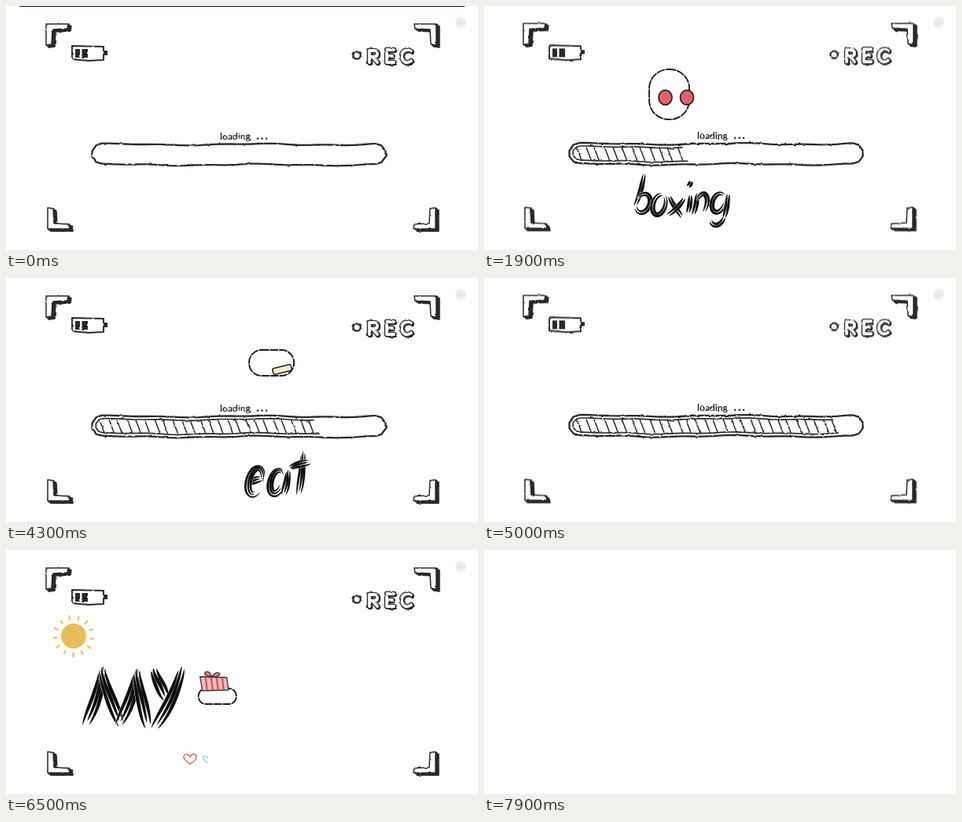
Animation of 600 by 312 pixels, one loop 8 s. Source, as an HTML page:

```html
<!DOCTYPE html>
<html lang="en">
<head>
<meta charset="utf-8">
<title>My day</title>
<style>
html, body { margin: 0; width: 100%; height: 100%; overflow: hidden; background: #fdfdfd; }
svg { display: block; width: 100vw; height: 100vh; }
</style>
</head>
<body>
<svg id="stage" viewBox="0 0 600 312" xmlns="http://www.w3.org/2000/svg"></svg>
<script>
const INK = '#292929', PAPER = '#fdfdfd';
const LOOP = 8000, STEP = 100;
const TURN = Math.PI * 2;
const stage = document.getElementById('stage');

const times = (n, fn) => Array.from({ length: n }, (_, i) => fn(i));
const pathOf = pts => 'M' + pts.map(p => p.map(v => v.toFixed(1)).join(' ')).join('L');
const line = (d, width) =>
  `<path d="${d}" fill="none" stroke="${INK}" stroke-width="${width}" stroke-linecap="round" stroke-linejoin="round"/>`;

// Pen moves: u in 0..1 gives a point. Stems start upright and sweep sideways.
const stem = (x0, y0, x1, y1) => u => [x0 + (x1 - x0) * u ** 1.4, y0 + (y1 - y0) * u];
const arc = (cx, cy, rx, ry, from, to) => u => {
  const a = (from + (to - from) * u) * TURN;
  return [cx + rx * Math.cos(a) - 0.2 * ry * Math.sin(a), cy + ry * Math.sin(a)];
};

// Brush stroke made of n tapering strands that draw together at the ends
function brush(pen, width, n) {
  const steps = 28;
  const strands = times(n, k => {
    const from = 0.04 * ((k * 2 + 1) % n), to = 1 - 0.04 * ((k + 1) % n);
    const left = [], right = [];
    for (let j = 0; j <= steps; j++) {
      const v = j / steps, u = from + (to - from) * v;
      const [x, y] = pen(u), [px, py] = pen(Math.max(0, u - 0.01)), [qx, qy] = pen(Math.min(1, u + 0.01));
      const dx = qx - px, dy = qy - py, len = Math.hypot(dx, dy) || 1;
      const swell = Math.sin(Math.PI * Math.min(0.999, v)) ** 0.6;
      const off = (k - (n - 1) / 2) * width / n * (0.55 + 0.45 * swell) + 0.05 * width * Math.sin(u * 6 + k);
      const half = width / n * 0.42 * swell;
      const side = h => [x - dy / len * (off + h), y + dx / len * (off + h)];
      left.push(side(half));
      right.unshift(side(-half));
    }
    return pathOf(left.concat(right)) + 'Z';
  });
  return `<path d="${strands.join('')}" fill="#0c0c0c" stroke="${PAPER}" stroke-width="1" paint-order="stroke"/>`;
}
const word = (label, width, n, pens) =>
  `<g role="img" aria-label="${label}">${pens.map(p => brush(p, width, n)).join('')}</g>`;

const title = word('MY DAY', 16, 3, [
  stem(124, 148, 101, 225), stem(122, 150, 147, 224), stem(168, 151, 143, 225), stem(166, 152, 181, 227),
  stem(188, 151, 204, 190), stem(224, 148, 188, 230),
  stem(293, 152, 281, 222), arc(290, 186, 41, 37, -0.31, 0.28),
  stem(373, 148, 344, 225), stem(373, 149, 389, 226), stem(341, 203, 386, 194),
  stem(396, 152, 407, 189), stem(431, 146, 398, 230)
]);
const boxing = word('boxing', 7.5, 2, [
  stem(204, 213, 192, 256), arc(202, 252, 9, 12, 0.55, 1.45),
  arc(223, 254, 8, 13, -0.2, 0.8),
  stem(236, 242, 252, 270), stem(255, 245, 233, 268),
  stem(263, 241, 259, 265), stem(264, 224, 259, 231),
  stem(272, 238, 266, 267), arc(276, 254, 7, 14, 0.55, 1.12),
  arc(298, 252, 8, 12, -0.1, -1.05), stem(311, 239, 305, 272), arc(297, 269, 9, 11, 0, 0.42)
]);
const eat = word('eat', 10, 3, [
  stem(307, 264, 325, 256), arc(317, 260, 9, 17, 0.02, -0.87),
  arc(344, 261, 8, 15, -0.1, -1), stem(359, 245, 353, 278),
  stem(378, 221, 372, 278), stem(361, 243, 387, 235)
]);

// L-shaped bracket mirrored into each corner, extruded down and to the right
function bracket(x, y, sx, sy) {
  const layer = (k, fill) =>
    `<path transform="translate(${x + k} ${y + k * 0.75}) scale(${sx} ${sy})" d="M0 0H28L27 6L8 7L7 26L0 27Z" fill="${fill}" stroke="${INK}" stroke-width="1.500" stroke-linejoin="round"/>`;
  return times(4, i => layer(4 - i, INK)).join('') + layer(0, PAPER);
}

function recLabel() {
  const d = 'M462 72V57H467Q472 57 472 61T467 65H463M467 66L472 72M493 56H484V72H493M484 64H491M515 58Q511 55 507 57Q503 59 503 64Q503 70 508 72Q512 73 515 70';
  const pen = (w, color, shift = 0) =>
    `<path transform="translate(${shift} ${shift})" d="${d}" fill="none" stroke="${color}" stroke-width="${w}" stroke-linejoin="round" stroke-linecap="round"/>`;
  return `<g role="img" aria-label="REC"><circle cx="446" cy="63" r="4.700" fill="${PAPER}" stroke="${INK}" stroke-width="2.300"/>`
    + pen(6.5, INK, 1) + pen(6.5, INK) + pen(3.8, PAPER) + '</g>';
}

const battery = line('M84 51L124 52V69L105 70L84 68Z', 1.9)
  + `<path d="M88 55h6v11h-6zM96.500 55h7.500v11h-7.500zM125 57h4v6h-4z" fill="${INK}"/>`;
const hud = bracket(51, 23, 1, 1) + bracket(547, 23, -1, 1) + bracket(53, 285, 1, -1) + bracket(546, 285, -1, -1)
  + battery + recLabel();

// Hand-drawn capsule: a rounded bar with slow waves along its edges
function capsule(x0, x1, cy, r) {
  const n = 160;
  return pathOf(times(n, i => {
    const a = (i + 0.5) / n * TURN, c = Math.cos(a), s = Math.sin(a);
    const end = Math.min(1, Math.abs(s) * 14);
    const x = (x0 + x1) / 2 + Math.sign(c) * ((x1 - x0) / 2 - r) * Math.min(1, Math.abs(c) * 1.01)
      + Math.sign(c) * r * Math.sqrt(1 - end * end);
    return [x, cy + Math.sign(s) * r * end + 0.9 * Math.sin(x / 29) + 0.5 * Math.sin(x / 11 + s)];
  })) + 'Z';
}
const hatch = times(31, i => {
  const x = 119 + i * 11.6 + Math.sin(i * 2.4);
  return `M${x} 182L${x + 6} 198`;
}).join('');
const bar = line(capsule(109, 483, 190, 13), 2.3)
  + `<g clip-path="url(#fillClip)">${line(capsule(114, 478, 190, 9), 1.7)}${line(hatch, 1.5)}</g>`
  + `<text x="272" y="171" font-family="Lato, sans-serif" font-size="12" font-weight="700" fill="${INK}">loading</text>`
  + times(3, i => `<circle cx="${320 + i * 5.5}" cy="169.500" r="1.200" fill="${INK}"/>`).join('');

// The performer: one plain rounded shape
const blob = (x, y, w, h) =>
  `<rect x="${x}" y="${y}" width="${w}" height="${h}" rx="${Math.min(w, h) * 0.48}" fill="#fff" stroke="#1c1c1c" stroke-width="1.900" stroke-dasharray="9 2.500" stroke-linecap="round"/>`;
const glove = (id, x) =>
  `<ellipse id="${id}" cx="${x}" cy="117" rx="8.500" ry="9.300" fill="#e85f66" stroke="#222" stroke-width="1.700"/>`;
const boxer = blob(210, 81, 51, 64) + glove('gloveL', 230.5) + glove('gloveR', 258);
const eater = blob(310, 92, 57, 33)
  + '<rect x="340" y="113" width="24" height="8" rx="2" fill="#f5ecc8" stroke="#222" stroke-width="1.500" transform="rotate(-14 352 117)"/>';
const carrier = blob(473, 177, 48, 20)
  + '<path d="M475 162L509 163L511 179L478 180Z" fill="#f3b9b9" stroke="#333" stroke-width="1.300"/>'
  + `<path d="${times(4, i => `M${482 + i * 7} 163L${484 + i * 7} 179`).join('')}" stroke="#c9585e" stroke-width="2.200"/>`
  + '<path d="M490 162Q478 161 482 156Q487 154 490 162Q496 154 500 158Q501 162 490 162Z" fill="#e07f82" stroke="#333" stroke-width="1.300"/>';

const rays = times(13, i => {
  const a = i / 13 * TURN, at = r => `${86 + Math.cos(a) * r} ${110 + Math.sin(a) * r}`;
  return `M${at(22)}L${at(25 + i % 2)}`;
}).join('');
const sun = '<circle cx="86" cy="110" r="16" fill="#e8bc58"/>'
  + `<path id="rays" d="${rays}" stroke="#ecc672" stroke-width="2.600" stroke-linecap="round"/>`;

const tints = ['#e8756b', '#79d6bd', '#ecdb9a', '#ead27a', '#cfb0c4', '#e5807a', '#74dab8'];
const hearts = tints.map((color, i) => {
  const s = 0.8 + 0.2 * Math.cos(i * 2.1);
  return `<path transform="translate(${234 + i * 21.9} ${268 - s}) rotate(${8 * Math.sin(i * 3)}) scale(${s} ${s * 0.85})" d="M0 8C-5 4 -9 0 -8 -4C-7 -8 -2 -8 0 -3C2 -9 8 -8 8 -3C8 1 4 5 0 8Z" fill="none" stroke="${color}" stroke-width="1.700"/>`;
}).join('');

const rough = seed => `<filter id="rough${seed}" filterUnits="userSpaceOnUse" x="0" y="0" width="600" height="312" color-interpolation-filters="sRGB">
  <feTurbulence type="fractalNoise" baseFrequency=".16" numOctaves="2" seed="${seed + 4}"/>
  <feDisplacementMap in="SourceGraphic" scale="2.400" xChannelSelector="R" yChannelSelector="G"/></filter>`;

stage.innerHTML = `<defs>${rough(0)}${rough(1)}
  <clipPath id="fillClip"><polygon id="fillEdge" points=""/></clipPath>
  <clipPath id="dayClip"><rect id="dayEdge" width="0" height="312"/></clipPath>
  <clipPath id="screen"><rect x="17" width="566" height="312"/></clipPath></defs>
  <rect width="600" height="312" fill="${PAPER}"/>
  <g id="scene">
    <path id="topLine" d="M17 .4H583" stroke="#111" stroke-width="1.200"/>
    <circle cx="578" cy="21" r="6.800" fill="#ececec"/>
    <g id="hud">${hud}</g>
    <g id="loading">
      <g id="bar">${bar}</g>
      <g id="boxing">${boxing}${boxer}</g>
      <g id="eat">${eat}<g id="eater">${eater}</g></g>
    </g>
    <g id="day">
      <g clip-path="url(#dayClip)">${sun}${title}${hearts}</g>
      <g clip-path="url(#screen)"><g id="carrier">${carrier}</g></g>
    </g>
  </g>`;

const set = (id, name, value) => document.getElementById(id).setAttribute(name, value);
const show = (id, on) => set(id, 'display', on ? 'inline' : 'none');

const progress = [[300, 110], [1900, 260], [3200, 363], [4300, 398], [5400, 482]];
function track(keys, t) {
  const i = keys.findIndex(k => t < k[0]);
  if (i === 0) return keys[0][1];
  if (i < 0) return keys[keys.length - 1][1];
  const [t0, a] = keys[i - 1], [t1, b] = keys[i];
  return a + (b - a) * (t - t0) / (t1 - t0);
}

function draw(now) {
  const t = Math.floor((now % LOOP) / STEP) * STEP;
  const pose = t % 650 > 405 ? 1 : 0;
  show('scene', t < 7900);
  show('topLine', t < 300);
  for (const id of ['hud', 'bar']) {
    set(id, 'filter', `url(#rough${pose})`);
    set(id, 'transform', `translate(${-pose} ${-0.7 * pose})`);
  }

  show('loading', t < 5600);
  const edge = track(progress, t);
  set('fillEdge', 'points', `100,170 ${edge - 11},170 ${edge + 4},208 100,208`);
  show('boxing', t >= 1100 && t < 2500);
  const jab = t % 400 < 200 ? 3 : 0;
  set('gloveL', 'cx', 230.5 + jab);
  set('gloveR', 'cx', 258 + jab);
  show('eat', t >= 2500 && t < 4700);
  set('eater', 'transform', `translate(${pose - 1} ${-pose})`);

  // The carrier crosses the stage and uncovers the title behind it
  show('day', t >= 5700);
  const front = 26 + (t - 5800) * 0.381;
  set('carrier', 'transform', `translate(${front - 521} ${t % 200 ? 0 : -1})`);
  set('dayEdge', 'width', Math.max(0, front - 36));
  set('rays', 'transform', `rotate(${pose ? 0 : 8} 86 110)`);
}

function tick() {
  draw(performance.now());
  requestAnimationFrame(tick);
}
tick();
</script>
</body>
</html>
```
